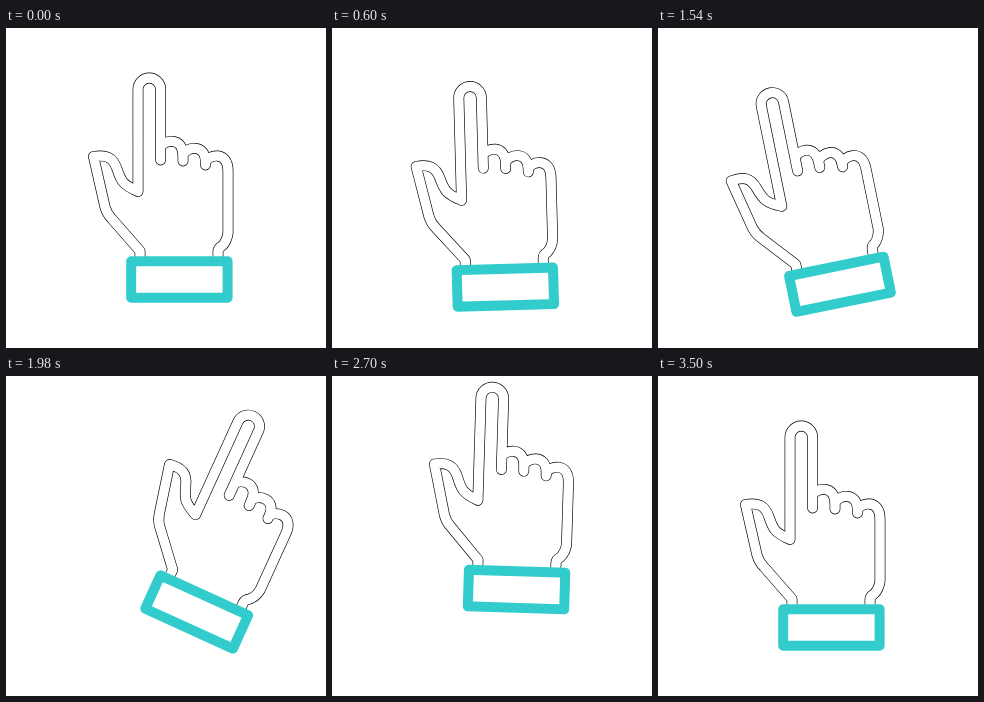
An HTML page that plays this animation: 320 by 320 pixels, repeating every 3600 ms.

```html
<!DOCTYPE html>
<html lang="en">
<head>
<meta charset="utf-8">
<title>Tapping hand</title>
<style>
  html, body { margin: 0; width: 100%; height: 100%; overflow: hidden; background: #fff; }
  svg { display: block; width: 320px; height: 320px; }
  path, rect { stroke-linejoin: round; }
</style>
</head>
<body>
<svg viewBox="0 0 320 320">
  <circle id="ring" fill="none" stroke="#33cccc"/>
  <g id="hand">
    <path class="skin" fill="#fff" stroke="#000" stroke-width="10.8"/>
    <path class="skin" fill="none" stroke="#fff" stroke-width="9.5"/>
    <rect x="125.2" y="233.2" width="96.4" height="36.6" fill="#fff" stroke="#33cccc" stroke-width="10"/>
  </g>
</svg>
<script>
const LOOP = 3600, STEP = 20;
const PIVOT = { x: 173.5, y: 251.5 };
const REST = { x: 173.5, y: 251.5, rot: 0 };

// Moves between poses: [start, end] for the position and for the turn
const MOVES = [
  { to: { x: 173.3, y: 276.5, rot: -12 }, pos: [490, 790], turn: [530, 840] },
  { to: { x: 190.8, y: 236, rot: 24.5 }, pos: [1360, 1720], turn: [1520, 1820] },
  { to: { x: 181.5, y: 202, rot: -32 }, pos: [2420, 2880], turn: [2500, 2960] },
  { to: REST, pos: [3160, 3460], turn: [3200, 3500] }
];

// Taps: start of the press, start and centre of the ring
const TAPS = [
  { press: 80, ring: 80, x: 143, y: 61 },
  { press: 980, ring: 980, x: 107, y: 100 },
  { press: 1980, ring: 2095, x: 244, y: 47 },
  { press: 2960, ring: 2985, x: 59.5, y: 62 }
];
const RING_LIFE = 500;

const hand = document.getElementById('hand');
const ring = document.getElementById('ring');
const skins = document.querySelectorAll('.skin');

const clamp = v => Math.min(1, Math.max(0, v));
const part = (t, a, b) => clamp((t - a) / (b - a));
const ease = v => v * v * (3 - 2 * v);
const span = (t, [a, b]) => ease(part(t, a, b));

function poseAt(t) {
  const p = { ...REST };
  let from = REST;
  for (const { to, pos, turn } of MOVES) {
    const k = span(t, pos);
    p.x += (to.x - from.x) * k;
    p.y += (to.y - from.y) * k;
    p.rot += (to.rot - from.rot) * span(t, turn);
    from = to;
  }
  return p;
}

function pressAt(t) {
  return TAPS.reduce((sum, { press }) =>
    sum + span(t, [press, press + 160]) - span(t, [press + 220, press + 460]), 0);
}

// Centre line of the hand; pressing shortens the finger and pulls in the thumb
function handPath(press) {
  const tip = 61.3 + 22.5 * press;
  const k = 6.5 * press;
  const th = 15 * press;
  return `M134 231V223L106 191Q101 186 99 179
    L${87.5 + th} 128.5
    C${100 + th * 0.8} 126.5 ${107 + th * 0.5} 129 ${111 + th * 0.3} 141
    C115 153 117 157 132 163.5
    V${tip}A11.3 11.3 0 0 1 154.6 ${tip}
    V${132 + k}V${119 + k}
    C158 ${112 + k} 177 ${108 + k} 177 ${128 + k}
    V${133 + k}V${127 + k}
    C180 ${119 + k} 199.5 ${115 + k} 199.5 ${134 + k}
    V${137 + k}V${134 + k}
    C202 ${127 + k} 222 ${122 + k} 222 ${143 + k}
    V205Q221 213 216 218Q212 220 212 224V231`;
}

function drawRing(t) {
  const tap = TAPS.find(({ ring: s }) => t >= s && t < s + RING_LIFE);
  if (!tap) {
    ring.setAttribute('opacity', 0);
    return;
  }
  const age = t - tap.ring;
  const radius = 19.7 + 15.3 * age / RING_LIFE;
  const alpha = 0.92 * part(age, 0, 150) * (1 - part(age, 310, RING_LIFE));
  ring.setAttribute('cx', tap.x);
  ring.setAttribute('cy', tap.y);
  ring.setAttribute('r', radius * 0.77);
  ring.setAttribute('stroke-width', radius * 0.46);
  ring.setAttribute('opacity', alpha);
}

function draw(now) {
  const t = Math.floor((now % LOOP) / STEP) * STEP;
  const { x, y, rot } = poseAt(t);
  const d = handPath(pressAt(t));
  skins.forEach(s => s.setAttribute('d', d));
  hand.setAttribute('transform',
    `translate(${x} ${y}) rotate(${rot}) translate(${-PIVOT.x} ${-PIVOT.y})`);
  drawRing(t);
}

const begin = performance.now();
function tick() {
  draw(performance.now() - begin);
  requestAnimationFrame(tick);
}
tick();
</script>
</body>
</html>
```
